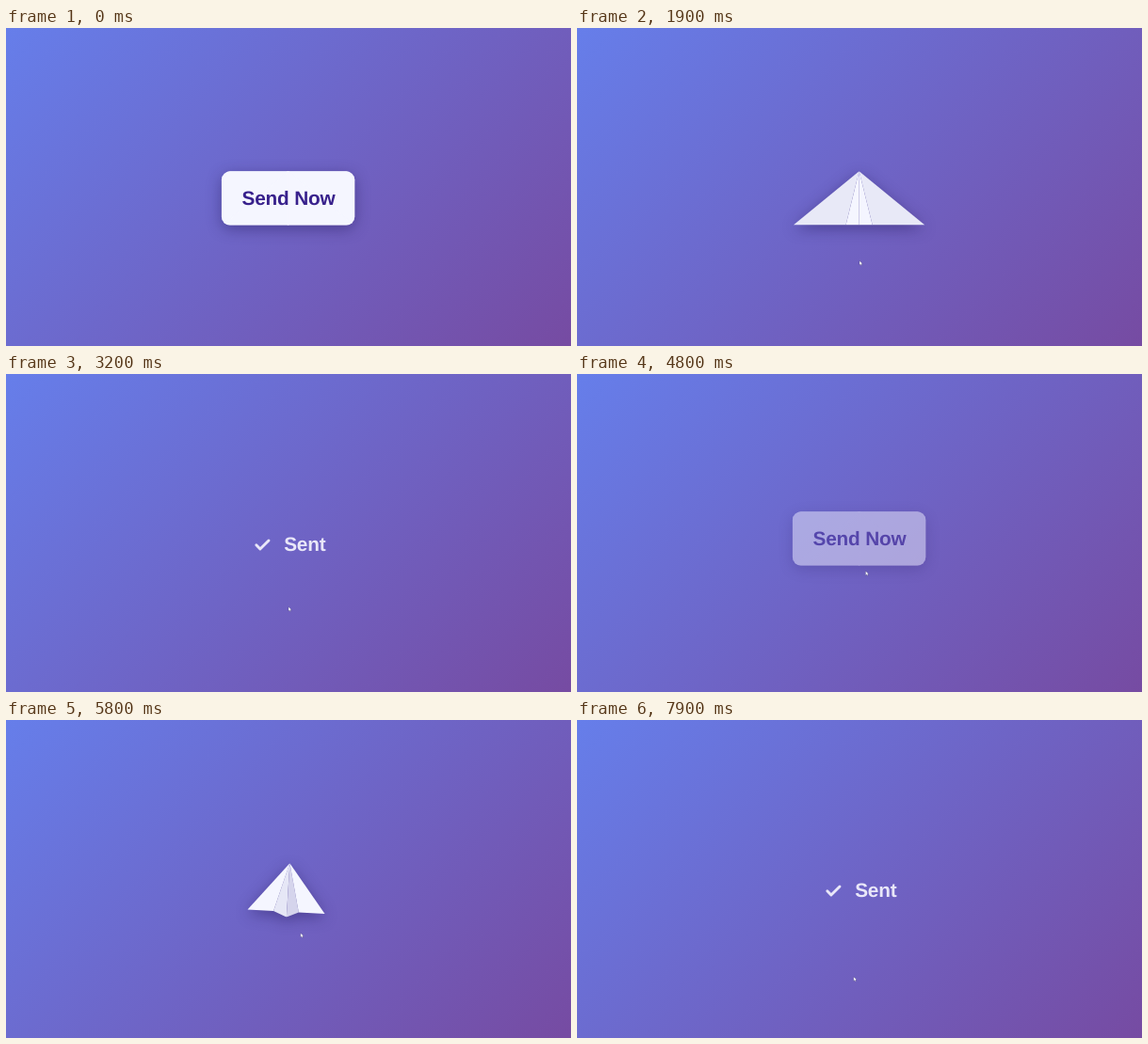
An HTML page that plays this animation: 600x338 px, repeating every 8000 ms.

```html
<!DOCTYPE html>
<html lang="en">
<head>
<meta charset="utf-8">
<title>Send button</title>
<style>
  html, body { margin: 0; width: 100%; height: 100%; overflow: hidden; }
  body { background: linear-gradient(135deg, #667eea, #764ba2); }
  svg { display: block; width: 100%; height: 100%; }
  text {
    font: bold 20.8px "Liberation Sans", Arial, sans-serif;
    letter-spacing: -.2px;
    text-rendering: geometricPrecision;
  }
  #shadow { filter: drop-shadow(0 4px 8px rgba(28, 16, 80, .42)); }
</style>
</head>
<body>
<svg viewBox="0 0 600 338">
  <defs>
    <clipPath id="clip"><rect id="box"/></clipPath>
  </defs>
  <g id="button">
    <g id="shadow">
      <g id="plane">
        <g id="paper" clip-path="url(#clip)">
          <polygon id="leftBody"/><polygon id="leftWing"/>
          <polygon id="rightBody"/><polygon id="rightWing"/>
        </g>
      </g>
    </g>
    <text id="label" x="300" y="187.8" text-anchor="middle" fill="#38218c">Send Now</text>
  </g>
  <g id="success" fill="#e9e7f8">
    <path d="M265.8 181.8L269.9 186L279 177" fill="none" stroke="#e9e7f8"
      stroke-width="2.9" stroke-linecap="round" stroke-linejoin="round"/>
    <text x="295.2" y="187.8">Sent</text>
  </g>
  <path id="cursor" d="M0 0V4.4L1.1 3.5L1.9 5L2.6 4.6L1.9 3.2L3.2 3Z" fill="#fff"
    stroke="#1c1640" stroke-opacity=".5" stroke-width=".4"/>
</svg>
<script>
const $ = id => document.getElementById(id);
const set = (id, attrs) => {
  for (const name in attrs) $(id).setAttribute(name, attrs[name]);
};

const LOOP = 8000;
const FIRST_CLICK = 1698, SECOND_CLICK = 5392;
const RETURN_AT = 4722;
const SCALE = 1.4;
const BOX = { x: 228.9, y: 152.3, width: 141.4, height: 57.3 };
const CENTER = [BOX.x + BOX.width / 2, BOX.y + BOX.height / 2];

const PRIMARY = [245, 246, 255];
const DARK = [226, 226, 243];
const DARKEST = [203, 202, 230];

const clamp = v => Math.max(0, Math.min(1, v));
const mix = (a, b, p) => a + (b - a) * p;
const mixColor = (a, b, p) => a.map((v, i) => mix(v, b[i], p));
// Eased progress of a stage that begins at `start` and lasts `length`.
const stage = (t, start, length) => 1 - (1 - clamp((t - start) / length)) ** 2;

const TOP = [50, 0], BOTTOM = [50, 100];
const mirror = ([x, y]) => [100 - x, y];

// Corners in percent of the button box.
function corners(t) {
  if (t < 200) {
    const fold = stage(t, 0, 200);
    const left = { corner: [50 * fold, 100 * fold], tip: [0, 100], inner: [0, 100] };
    const right = {};
    for (const name in left) right[name] = mirror(left[name]);
    return { left, right };
  }
  const lift = stage(t, 200, 200);
  const turn = stage(t, 400, 250);
  const y = 100 - 10 * lift;
  return {
    left: { corner: TOP, tip: [20 * lift + 7 * turn, y + 5 * turn], inner: [40, y] },
    right: {
      corner: TOP,
      tip: [100 - 20 * lift - 20 * turn, y - 7 * turn],
      inner: [60 - 15 * turn, y]
    }
  };
}

function drawShape(id, points, color) {
  const place = ([x, y]) => [BOX.x + x * BOX.width / 100, BOX.y + y * BOX.height / 100];
  const rgb = `rgb(${color.map(Math.round)})`;
  set(id, { points: points.map(place).join(" "), fill: rgb, stroke: rgb });
}

function drawSide(side, { corner, tip, inner }, wing, body) {
  // While the sheet is still folding, the wing also hangs from the top centre.
  drawShape(side + "Wing", [TOP, corner, inner, tip], wing);
  drawShape(side + "Body", [TOP, BOTTOM, inner], body);
}

function drawPlane(t) {
  const { left, right } = corners(t);
  const wing = mixColor(PRIMARY, DARKEST, stage(t, 0, 100) - stage(t, 100, 230));
  const shade = stage(t, 200, 400);
  drawSide("left", left, wing, mixColor(PRIMARY, DARK, shade));
  drawSide("right", right, wing, mixColor(PRIMARY, DARKEST, shade));

  const turn = stage(t, 400, 250);
  const pull = stage(t, 650, 200);
  const fly = stage(t, 850, 300);
  const angle = 50 * turn + 5 * pull - 15 * fly;
  const x = SCALE * (-8 * pull + 53 * fly);
  const y = SCALE * (24 * pull - 204 * fly);
  set("plane", {
    transform: `rotate(${angle} ${CENTER}) translate(${x} ${y})`,
    opacity: 1 - fly
  });

  const flat = 1 - stage(t, 0, 100);
  set("box", { rx: 9 * flat });
  set("paper", { "stroke-width": 1.5 * flat }); // hides the creases of the flat sheet
  set("label", { opacity: flat });
}

// Cursor glides: start, end, x, y.
const ENTER = 400;
const GLIDES = [
  [400, 800, 303, 224],
  [1050, 1400, 299, 195],
  [1700, 1900, 300, 247.5],
  [3950, 4800, 306.5, 209.5],
  [4900, 5200, 308, 200],
  [5400, 5800, 312.8, 226.5],
  [5800, 6600, 313.5, 236.5],
  [7830, 7900, 293.8, 273]
];

function drawCursor(t) {
  let x = 152, y = 271;
  for (const [start, end, toX, toY] of GLIDES) {
    const p = clamp((t - start) / (end - start));
    x = mix(x, toX, p);
    y = mix(y, toY, p);
  }
  set("cursor", { transform: `translate(${x} ${y})`, opacity: t < ENTER ? 0 : 1 });
}

function draw(t) {
  const again = t >= RETURN_AT;
  const since = t - (again ? SECOND_CLICK : FIRST_CLICK);
  drawPlane(since);

  const back = again ? stage(t, RETURN_AT, 300) : 1;
  set("button", { opacity: back, transform: `translate(0 ${-8 * SCALE * (1 - back)})` });

  const shown = stage(since, 1195, 200);
  set("success", { opacity: shown, transform: `translate(${-12 * SCALE * (1 - shown)} 0)` });
  drawCursor(t);
}

set("box", BOX);
const start = performance.now();
function tick() {
  draw((performance.now() - start) % LOOP);
  requestAnimationFrame(tick);
}
tick();
</script>
</body>
</html>
```
